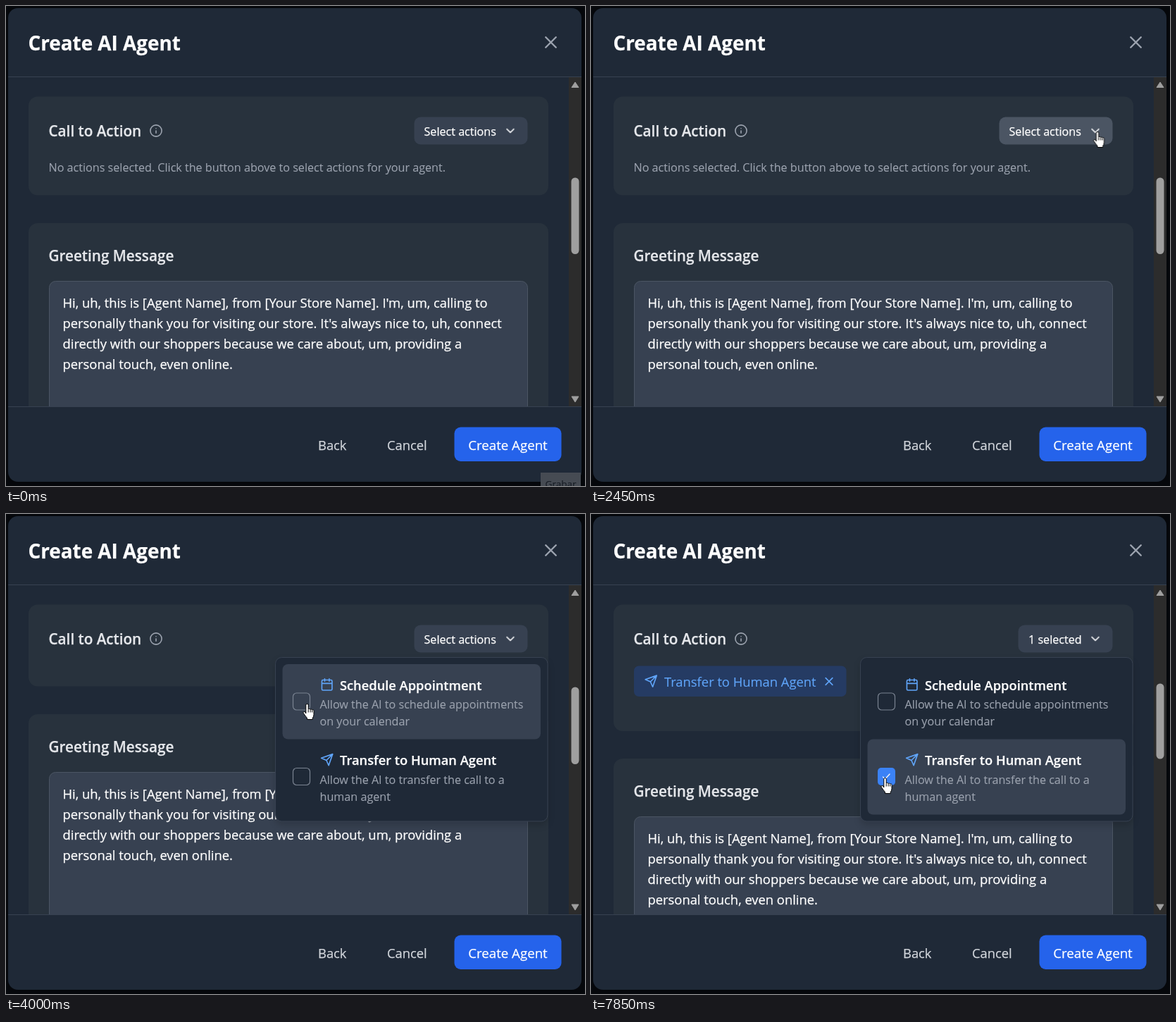
An HTML page for the animation above (8 s loop, 822 by 681 pixels).

```html
<!DOCTYPE html>
<html lang="en">
<head>
<meta charset="utf-8">
<title>Create AI Agent</title>
<style>
  html, body { margin: 0; width: 100%; height: 100%; overflow: hidden; background: #05070b; }
  svg { display: block; width: 822px; height: 681px; }
  text {
    --ink: #fff;
    font-family: "Open Sans", "Noto Sans", sans-serif;
    font-size: 18.38px;
    white-space: pre;
    fill: var(--ink);
    stroke: var(--ink);
    stroke-width: .25px;
  }
  .title { font-size: 27.85px; font-weight: 700; }
  .heading { --ink: #e5e7eb; font-size: 20.7px; font-weight: 600; }
  .option { font-size: 18.3px; font-weight: 600; }
  .small { font-size: 16.15px; }
  .muted { --ink: #9ca3af; stroke-width: .1px; }
  .plain { --ink: #d1d5db; }
  .blue { --ink: #60a5fa; stroke-width: .1px; }
  .icon { fill: none; stroke: #9ca3af; stroke-width: 2; stroke-linecap: round; stroke-linejoin: round; }
  .icon.azure { stroke: #60a5fa; }
  .icon.white { stroke: #f3f4f6; }
  .section { fill: #28323d; }
  .field { fill: #374151; stroke: #4b5563; }
  .box { fill: none; stroke: #7b8492; stroke-width: 1.2; }
  .gray { fill: #374151; }
  .scroll { fill: #9f9f9f; }

  /* Hard switches */
  .badge, .hint, .menu, .pick, .picked, .card, .greeting, .thumb, .arrow, .hand {
    animation: 8s step-end infinite;
  }
  .badge { animation-name: badge; }
  .hint { animation-name: hint; }
  .menu { animation-name: menu; }
  .pick { animation-name: pick; }
  .picked { animation-name: picked; }
  .card { animation-name: card; }
  .greeting { animation-name: greeting; }
  .thumb { animation-name: thumb; }
  .arrow { animation-name: arrow; }
  .hand { animation-name: hand; }
  @keyframes badge { 0% { opacity: 1 } .875%, 100% { opacity: 0 } }
  @keyframes hint { 0% { opacity: 1 } 31.5%, 100% { opacity: 0 } }
  @keyframes menu { 0% { opacity: 0 } 31.5%, 100% { opacity: 1 } }
  @keyframes pick { 0% { opacity: 1 } 98.125%, 100% { opacity: 0 } }
  @keyframes picked { 0% { opacity: 0 } 98.125%, 100% { opacity: 1 } }
  @keyframes card { 0% { height: 140px } 31.5% { height: 116px } 98.125%, 100% { height: 179.5px } }
  @keyframes greeting {
    0% { transform: translateY(0) }
    31.5% { transform: translateY(-24px) }
    98.125%, 100% { transform: translateY(39px) }
  }
  @keyframes thumb {
    0% { y: 243.5px; height: 108.5px }
    31.5% { y: 245.5px; height: 109.5px }
    98.125%, 100% { y: 240.5px; height: 107px }
  }
  @keyframes arrow { 0% { opacity: 0 } 8.3% { opacity: 1 } 20.4%, 100% { opacity: 0 } }
  @keyframes hand {
    0% { opacity: 0 } 7.5% { opacity: 1 } 8.3% { opacity: 0 } 20.4%, 100% { opacity: 1 }
  }

  /* Fades and pointer travel */
  .trigger, .first, .second, .pointer { animation: 8s linear infinite; }
  .trigger { animation-name: trigger; }
  .first { animation-name: first; }
  .second { animation-name: second; }
  .pointer { animation-name: pointer; }
  @keyframes trigger {
    0%, 20.6% { fill: #374151 }
    22.5%, 42.4% { fill: #4b5563 }
    43.375% { fill: #444d5b }
    45%, 100% { fill: #374151 }
  }
  @keyframes first { 0%, 43.5% { opacity: 0 } 45.5%, 70.6% { opacity: 1 } 72.5%, 100% { opacity: 0 } }
  @keyframes second { 0%, 70.6% { opacity: 0 } 72.5%, 100% { opacity: 1 } }
  @keyframes pointer {
    0%, 7.5% { transform: translate(707px, 611px) }
    9.125%, 11.625% { transform: translate(743px, 485px) }
    13.375% { transform: translate(748px, 321px) }
    15.5% { transform: translate(759px, 262px) }
    18.5% { transform: translate(702px, 212px) }
    21.625%, 22.625% { transform: translate(716.5px, 182px) }
    24.875%, 40.75% { transform: translate(718.5px, 178px) }
    43.375% { transform: translate(484.5px, 262px) }
    46.625%, 49.125% { transform: translate(432px, 277px) }
    50%, 68.375% { transform: translate(427px, 269px) }
    73.25%, 100% { transform: translate(417px, 374px) }
  }
</style>
</head>
<body>
<svg viewBox="0 0 822 681">
  <defs>
    <clipPath id="view"><rect x="3" y="101" width="814" height="467"/></clipPath>
    <filter id="shadow" x="-10%" y="-10%" width="120%" height="125%" color-interpolation-filters="sRGB">
      <feDropShadow dx="0" dy="5" stdDeviation="5" flood-opacity=".15"/>
    </filter>
    <path id="chevron" d="M-6-3 0 3 6-3"/>
    <path id="cross" d="M-6-6 6 6M6-6-6 6"/>
    <path id="send" d="M22 2 15 22 11 13 2 9ZM22 2 11 13"/>
    <path id="calendar" d="M5 4h14a2 2 0 0 1 2 2v14a2 2 0 0 1-2 2H5a2 2 0 0 1-2-2V6a2 2 0 0 1 2-2ZM16 2v4M8 2v4M3 10h18"/>
  </defs>

  <rect x="3" y="3" width="814" height="672" rx="14" fill="#1f2937"/>
  <text class="title" x="31.5" y="63">Create AI Agent</text>
  <use href="#cross" class="icon" transform="translate(773.5 51.5) scale(1.21)"/>

  <g clip-path="url(#view)">
    <rect class="section card" x="32" y="128.5" width="738" height="140" rx="13"/>
    <text class="heading" x="60.5" y="184.5">Call to Action</text>
    <g class="icon" transform="translate(213 177) scale(.807)">
      <circle r="10"/><path d="M0 4V0M0-4h.01"/>
    </g>
    <text class="small muted hint" x="60.5" y="234.5">No actions selected. Click the button above to select actions for your agent.</text>

    <g class="pick">
      <rect class="gray trigger" x="579.5" y="157.5" width="161" height="39" rx="9"/>
      <text class="small" x="593.5" y="183.5">Select actions</text>
    </g>
    <g class="picked">
      <rect class="gray" x="606.5" y="157.5" width="134" height="39" rx="9"/>
      <text class="small" x="621" y="183.5">1 selected</text>
      <rect x="61" y="215.5" width="301.5" height="43.5" rx="7" fill="#253b63"/>
      <use href="#send" class="icon azure" transform="translate(75.5 227.5) scale(.807)"/>
      <text class="blue" x="104" y="245">Transfer to Human Agent</text>
      <use href="#cross" class="icon azure" transform="translate(338 237.5) scale(.807)"/>
    </g>
    <use href="#chevron" class="icon white" transform="translate(716 177) scale(.807)"/>

    <g class="greeting">
      <rect class="section" x="32" y="308" width="738" height="420" rx="13"/>
      <text class="heading" x="60.5" y="362">Greeting Message</text>
      <rect class="field" x="61.5" y="390.5" width="679" height="300" rx="9"/>
      <text x="80.5" y="428">Hi, uh, this is [Agent Name], from [Your Store Name]. I'm, um, calling to</text>
      <text x="80.5" y="457">personally thank you for visiting our store. It's always nice to, uh, connect</text>
      <text x="80.5" y="486">directly with our shoppers because we care about, um, providing a</text>
      <text x="80.5" y="515">personal touch, even online.</text>
    </g>

    <rect x="799" y="101" width="18" height="467" fill="#2c2c2c"/>
    <path class="scroll" d="M808 108 813 115.5H803ZM808 562 813 554H803Z" stroke="#9f9f9f" stroke-linejoin="round"/>
    <rect class="scroll thumb" x="802.5" y="243.5" width="11" height="108.5" rx="5.5"/>
  </g>

  <path d="M3 100.5H817M3 568.5H817" stroke="#374151"/>
  <text class="plain" x="443" y="629.5">Back</text>
  <text class="plain" x="541" y="629.5">Cancel</text>
  <rect x="636.5" y="597.5" width="152" height="48.5" rx="9" fill="#2563eb"/>
  <text x="712.5" y="629.5" text-anchor="middle" style="font-size:18.7px">Create Agent</text>

  <g class="menu">
    <rect x="382.5" y="203.5" width="386.5" height="232.5" rx="9" fill="#1f2937" stroke="#374151" filter="url(#shadow)"/>
    <rect class="gray first" x="392.5" y="213" width="366.5" height="106.5" rx="8"/>
    <rect class="gray second" x="392.5" y="319.5" width="366.5" height="107" rx="8"/>

    <rect class="box" x="407.5" y="254" width="24" height="24" rx="5"/>
    <use href="#calendar" class="icon azure" transform="translate(446 232.3) scale(.807)"/>
    <text class="option" x="474" y="249.5">Schedule Appointment</text>
    <text class="small muted" x="445.5" y="275.5">Allow the AI to schedule appointments</text>
    <text class="small muted" x="445.5" y="299.5">on your calendar</text>

    <rect class="box pick" x="407.5" y="360.5" width="24" height="24" rx="5"/>
    <g class="picked">
      <rect x="407" y="360" width="25" height="25" rx="5" fill="#3b82f6"/>
      <path class="icon white" d="M414.5 373 417.5 376 424 369" style="stroke-width:1.4"/>
    </g>
    <use href="#send" class="icon azure" transform="translate(446 339) scale(.807)"/>
    <text class="option" x="474" y="356">Transfer to Human Agent</text>
    <text class="small muted" x="445.5" y="382.5">Allow the AI to transfer the call to a</text>
    <text class="small muted" x="445.5" y="406.5">human agent</text>
  </g>

  <g class="badge">
    <rect x="759" y="662" width="57" height="19" fill="#464b53"/>
    <text x="787.5" y="683" text-anchor="middle" style="--ink:#1b2028;font-size:13.5px">Grabar</text>
  </g>

  <g class="pointer" fill="#fff" stroke="#000" stroke-linejoin="round">
    <path class="arrow" d="M0 0V16L3.7 12.6 6.2 18.4 8.7 17.3 6.3 11.7H11.2Z"/>
    <g class="hand">
      <path d="M-1.2 14V2.2a1.7 1.7 0 0 1 3.4 0V8.2a1.6 1.6 0 0 1 2.9.4a1.5 1.5 0 0 1 2.6.7a1.3 1.3 0 0 1 2.3 1V15.5q0 3-1.8 5V22.5H.5V20.5Q-1.7 18-4.8 13.4a1.5 1.5 0 0 1 2.3-1.7Z"/>
      <path d="M2.2 8.5v4M5.1 9v3.5M7.7 9.8v2.7" fill="none"/>
    </g>
  </g>
</svg>
</body>
</html>
```
